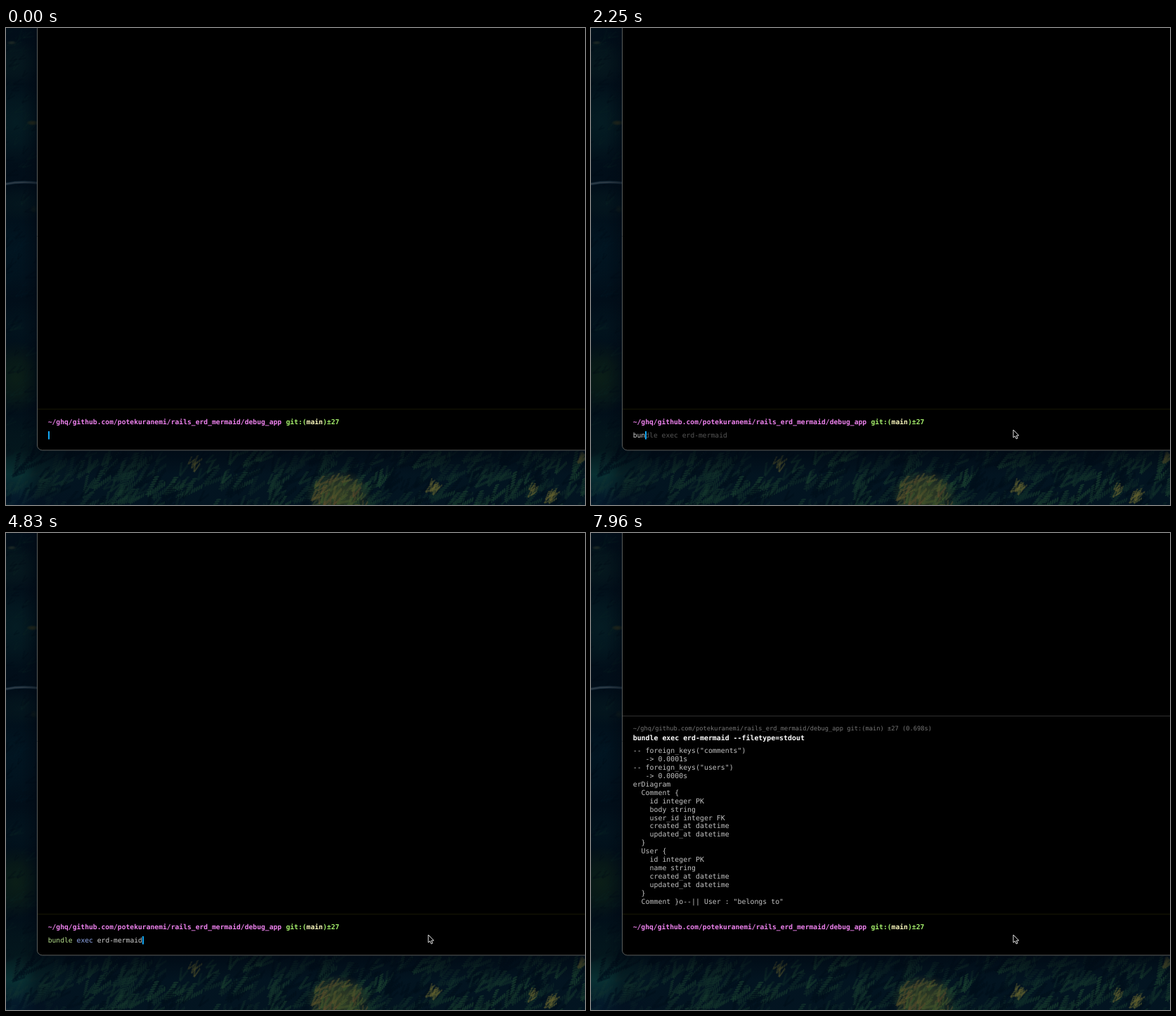
These frames come from a looping animation (824 px wide and 679 px high, 8 s). An HTML page with a canvas:

```html
<!DOCTYPE html>
<html lang="en">
<head>
<meta charset="utf-8">
<title>Terminal</title>
<style>
html, body { margin: 0; width: 100%; height: 100%; overflow: hidden; background: #000; }
canvas { display: block; }
</style>
</head>
<body>
<canvas id="stage" width="824" height="679"></canvas>
<script>
const W = 824, H = 679, LOOP = 8000;
const ctx = document.getElementById('stage').getContext('2d');
const MONO = '"DejaVu Sans Mono", monospace';
const EM = 0.602;
const LEFT = 59.7, CELL = 5.84;
const PATH = '~/ghq/github.com/potekuranemi/rails_erd_mermaid/debug_app';
const COMMAND = 'bundle exec erd-mermaid --filetype=stdout';
const OUTPUT = `-- foreign_keys("comments")
   -> 0.0001s
-- foreign_keys("users")
   -> 0.0000s
erDiagram
  Comment {
    id integer PK
    body string
    user_id integer FK
    created_at datetime
    updated_at datetime
  }
  User {
    id integer PK
    name string
    created_at datetime
    updated_at datetime
  }
  Comment }o--|| User : "belongs to"`.split('\n');

const RUN_AT = 6700, DONE_AT = 7400;
// [time, number of characters on the command line]
const KEYS = [[0, 0]];
for (let i = 0; i < 7; i++) KEYS.push([1950 + i * 120, i + 1]);
KEYS.push([3500, 23], [5200, 24], [5550, 25], [6250, 41]);

let seed = 7;
function rand(a = 0, b = 1) {
  seed = (seed * 16807) % 2147483647;
  return a + (b - a) * seed / 2147483647;
}

function glow(g, x, y, rx, ry, rgb, alpha) {
  g.save();
  g.translate(x, y);
  g.scale(rx, ry);
  const fade = g.createRadialGradient(0, 0, 0, 0, 0, 1);
  fade.addColorStop(0, `rgba(${rgb},${alpha})`);
  fade.addColorStop(0.5, `rgba(${rgb},${alpha * 0.65})`);
  fade.addColorStop(1, `rgba(${rgb},0)`);
  g.fillStyle = fade;
  g.fillRect(-1, -1, 2, 2);
  g.restore();
}

// A drooping branch: leaflets on both sides of a slanted stem.
function branch(g, x, y, size, angle, color) {
  g.fillStyle = color;
  for (let i = 0; i < 8; i++) {
    const k = i / 7, spread = size * 0.26 * (1.1 - k);
    const cx = x + Math.cos(angle) * size * k;
    const cy = y + Math.sin(angle) * size * k;
    for (const side of [-1, 1]) {
      g.beginPath();
      g.ellipse(cx - Math.sin(angle) * side * spread, cy + Math.cos(angle) * side * spread,
        size * 0.15, size * 0.05, angle + side * 0.6, 0, 7);
      g.fill();
    }
  }
}

function paintForest() {
  const layer = document.createElement('canvas');
  layer.width = W;
  layer.height = H;
  const g = layer.getContext('2d');
  g.fillStyle = '#041c2a';
  g.fillRect(0, 0, W, H);

  glow(g, 12, 50, 45, 35, '22,70,62', 0.8);
  glow(g, 14, 135, 48, 60, '14,80,78', 0.9);
  glow(g, 20, 250, 45, 26, '16,66,64', 0.7);
  glow(g, 10, 320, 60, 65, '4,58,76', 0.75);
  glow(g, 22, 425, 48, 36, '8,58,66', 0.6);
  glow(g, 14, 498, 46, 52, '38,88,34', 0.9);
  glow(g, 20, 605, 80, 65, '12,62,56', 0.9);

  for (let i = 0; i < 120; i++) {
    const y = rand(-5, 595), bright = rand();
    const blue = y > 265 && y < 390;
    branch(g, rand(-4, 46), y, rand(7, 15), rand(2, 2.9),
      bright > 0.5
        ? `rgba(${blue ? '8,70,88' : '34,104,74'},${rand(0.12, 0.32)})`
        : 'rgba(1,15,28,.38)');
  }

  for (let i = 0; i < 430; i++) {
    const y = 595 + i * 0.21;
    const x = rand(-5, 850);
    const lush = Math.sin(x * 0.026 + y * 0.05) * 0.5 + 0.5;
    const edge = Math.min(1, Math.max(0.2, (x + y - 640) / 130));
    const v = rand(0.2, 0.7 + lush * 0.5) * edge;
    const color = rand() < 0.36
      ? 'rgba(2,20,32,.75)'
      : `rgba(${10 + 30 * v},${38 + 58 * v},${46 + 18 * v},.72)`;
    branch(g, x, y, rand(13, 27), rand(1.95, 2.6), color);
  }
  glow(g, 40, 682, 72, 28, '3,22,42', 0.85);

  // Sunlit crowns
  glow(g, 474, 664, 46, 36, '106,118,52', 0.8);
  for (let i = 0; i < 44; i++) {
    const x = rand(443, 512), y = rand(630, 679) + Math.abs(x - 480) * 0.3;
    branch(g, x, y, rand(9, 17), rand(1.8, 2.7),
      `rgba(${rand(95, 165) | 0},${rand(108, 150) | 0},60,.65)`);
  }
  for (const [x, y, n] of [[612, 647, 7], [750, 654, 5], [780, 663, 8], [821, 610, 7], [270, 614, 4]]) {
    for (let i = 0; i < n; i++) {
      branch(g, x + rand(-5, 6), y + rand(-5, 6), rand(8, 14), rand(1.9, 2.5), 'rgba(158,152,66,.65)');
    }
  }
  glow(g, 8, 21, 7, 3, '116,130,85', 0.8);
  glow(g, 38, 135, 9, 4, '154,142,48', 0.9);
  glow(g, 40, 258, 6, 6, '92,106,48', 0.45);

  // Stream
  for (let i = 0; i < 3; i++) {
    g.strokeStyle = ['#336078', '#648ba0', '#a2b9c5'][i];
    g.lineWidth = 4 - i * 1.4;
    g.beginPath();
    g.moveTo(0, 222);
    g.quadraticCurveTo(20, 218, 44, 220.5);
    g.stroke();
  }

  const shade = (x0, y0, x1, y1, alpha) => {
    const fade = g.createLinearGradient(x0, y0, x1, y1);
    fade.addColorStop(0, `rgba(0,8,18,${alpha})`);
    fade.addColorStop(1, 'rgba(0,8,18,0)');
    g.fillStyle = fade;
    g.fillRect(0, 0, W, H);
  };
  shade(0, 601, 0, 636, 0.7);
  shade(44, 0, 22, 0, 0.4);

  // Terminal window, running off the top and right edges
  g.beginPath();
  g.roundRect(44.5, -20, W, 621, 7);
  g.fillStyle = '#000';
  g.fill();
  g.strokeStyle = '#5a5d5b';
  g.lineWidth = 1;
  g.stroke();
  return layer;
}

function text(str, x, y, cell, color, bold) {
  ctx.font = `${bold ? 'bold ' : ''}${cell / EM}px ${MONO}`;
  ctx.fillStyle = color;
  ctx.fillText(str, x, y);
}

function rule(y, color) {
  ctx.fillStyle = color;
  ctx.fillRect(45, y, W - 45, 1);
}

function prompt() {
  const parts = [[PATH, '#ee82ee'], [' git:(', '#a6f06c'], ['main', '#fbf9bd'], [')±27', '#a6f06c']];
  let col = 0;
  for (const [str, color] of parts) {
    text(str, LEFT + col * CELL, 564.3, CELL, color, true);
    col += str.length;
  }
}

function commandLine(n) {
  const y = 583;
  const words = [[0, 6, '#b6e08c'], [6, 11, '#91a8ea'], [11, 41, '#d0d0d0']];
  for (const [from, to, color] of words) {
    const done = n >= to || from === 11;
    text(COMMAND.slice(from, Math.min(to, n)), LEFT + from * CELL, y, CELL, done ? color : '#d0d0d0');
  }
  const end = n <= 7 ? 23 : 41;
  if (n > 0 && n !== 23) text(COMMAND.slice(n, end), LEFT + n * CELL, y, CELL, '#555');
}

function caret(n, idle) {
  if (idle % 1000 >= 500) return;
  ctx.fillStyle = '#12a8f5';
  ctx.fillRect(Math.round(LEFT + n * CELL), 574, 2, 11.5);
}

function block(top, suffix) {
  text(`${PATH} git:(main) ±27${suffix}`, LEFT, top + 20.6, 5.25, '#777');
  text(COMMAND, LEFT, top + 34.8, 5.963, '#fff', true);
}

function pointer(t) {
  const k = Math.min(1, (t - 650) / 350);
  if (k < 0) return;
  const away = (1 - k) ** 3;
  ctx.save();
  ctx.translate(601 + away * 230, 572 + away * 45);
  ctx.beginPath();
  ctx.moveTo(0, 0);
  for (const [x, y] of [[0, 11], [2.5, 8.9], [4.2, 12.8], [6.1, 12], [4.5, 8.2], [7.8, 8.1]]) ctx.lineTo(x, y);
  ctx.closePath();
  ctx.fillStyle = '#000';
  ctx.fill();
  ctx.strokeStyle = '#e6e6e6';
  ctx.lineWidth = 1;
  ctx.stroke();
  ctx.restore();
}

const backdrop = paintForest();

function draw(t) {
  ctx.textRendering = 'geometricPrecision';
  ctx.drawImage(backdrop, 0, 0);
  rule(542, '#171704');
  if (t < RUN_AT) {
    const [at, n] = KEYS.filter(key => key[0] <= t).pop();
    prompt();
    commandLine(n);
    caret(n, t - at);
  } else if (t < DONE_AT) {
    block(543, '');
    ctx.fillStyle = '#0cb4f5';
    ctx.fillRect(60, 587, 6, 11);
  } else {
    rule(260, '#303030');
    block(260, ' (0.698s)');
    OUTPUT.forEach((line, i) => text(line, LEFT, 313.2 + i * 11.92, 5.963, '#c2c2c2'));
    prompt();
    caret(0, t - DONE_AT);
  }
  pointer(t);
}

const start = performance.now();
function tick() {
  draw((performance.now() - start) % LOOP);
  requestAnimationFrame(tick);
}
tick();
</script>
</body>
</html>
```
